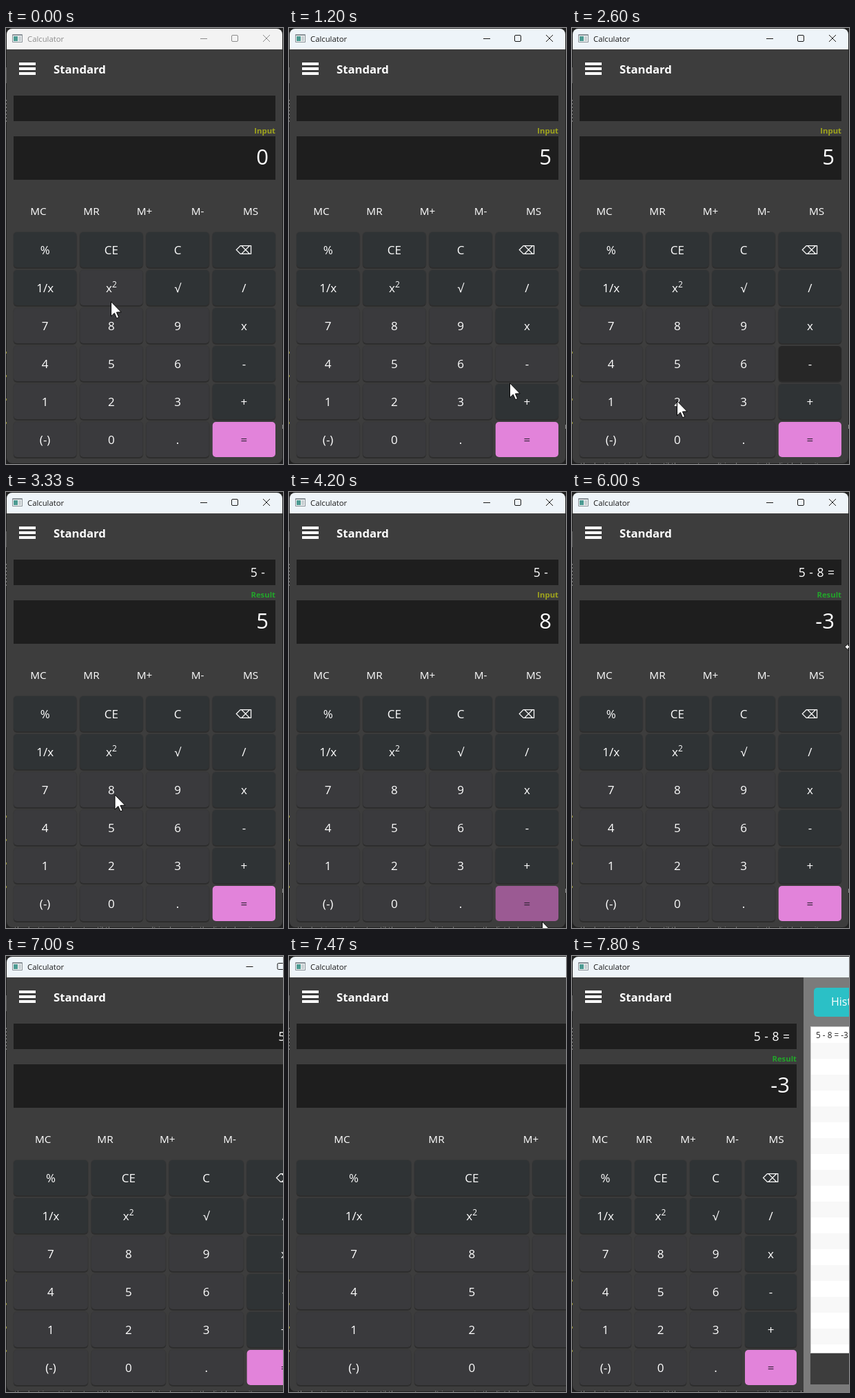
These frames come from a looping animation (402 px wide and 632 px high, 8 s). An HTML page with a canvas:

```html
<!DOCTYPE html>
<html lang="en">
<head>
<meta charset="utf-8">
<title>Calculator</title>
<style>
html, body { margin: 0; width: 100%; height: 100%; overflow: hidden; background: #202020; }
canvas { display: block; }
</style>
</head>
<body>
<canvas id="stage" width="402" height="632"></canvas>
<script>
const g = document.getElementById('stage').getContext('2d');
const LOOP = 8000, STEP = 200 / 3;
const FONT = '"Open Sans", "DejaVu Sans", sans-serif';
const KEYS = '% CE C ⌫ 1/x x² √ / 7 8 9 x 4 5 6 - 1 2 3 + (-) 0 . ='.split(' ');
const MEMORY = 'MC MR M+ M- MS'.split(' ');

// Moments at which the state changes, in ms
const FOCUS = 650, TYPE_5 = 770, PRESS_MINUS = 1700, MINUS_DONE = 2640, TYPE_8 = 3780,
  HOVER_EQUALS = 4190, RESULT = 4980, LEAVE_EQUALS = 5250, GRAB = 5960,
  DRAG = 6867, RELAYOUT = 7700, HISTORY = 7770;

// Pointer stops: arrival, rest in ms, x, y
const STOPS = [[0, 0, 152, 396], [500, 430, 153, 490], [1200, 0, 320, 514],
  [1700, 500, 343, 491], [2333, 200, 119, 579], [2600, 0, 152, 540],
  [3400, 667, 158, 429], [4200, 930, 367, 622], [5200, 0, 373, 558],
  [5400, 200, 352, 206], [GRAB, 0, 384, 212]];

function pointer(t) {
  const i = STOPS.findIndex(s => s[0] > t);
  const [start, rest, x, y] = STOPS[i - 1], [end, , x2, y2] = STOPS[i];
  const u = Math.max(0, (t - start - rest) / (end - start - rest));
  return [x + (x2 - x) * u, y + (y2 - y) * u];
}

function rect(x, y, w, h, fill, r = 0) {
  g.fillStyle = fill;
  g.beginPath();
  g.roundRect(x, y, w, h, r);
  g.fill();
}

function text(s, x, y, size, fill = '#fff', align = 'left', weight = 400) {
  g.font = `${weight} ${size}px ${FONT}`;
  g.textAlign = align;
  g.fillStyle = fill;
  g.fillText(s, x, y);
}

function outlined(path, x, y, scale) {
  g.save();
  g.translate(x, y);
  g.scale(scale, scale);
  g.lineWidth = 1 / scale;
  g.fillStyle = '#fff';
  g.strokeStyle = '#000';
  g.fill(path);
  g.stroke(path);
  g.restore();
}

const ARROW = new Path2D('M.4 .6V16.8L4.1 13.3 6.6 19 9 18 6.5 12.4 11.7 12.2Z');
const RESIZE = new Path2D('M0 0L5-5V-1.5H17V-5L22 0 17 5V1.5H5V5Z');

function backdrop() {
  rect(0, 0, 402, 632, '#202020');
  rect(0, 57, 1, 23, '#555');
  for (let y = 104; y < 136; y += 5) rect(0, y, 1, 2, '#777');
  for (let y = 469; y < 580; y += 34) rect(0, y, 1, 3, '#8f8a2a');
  rect(401, 575, 1, 6, '#888');
}

function titleBar(t, right) {
  const ink = t > FOCUS ? '#191919' : '#8c8c8c';
  g.save();
  g.beginPath();
  g.rect(0, 0, 402, 31);
  g.clip();
  rect(1, 1, right - 1, 40, t > 900 ? '#eef4f9' : '#f3f3f3', 8);
  g.restore();
  rect(9, 9, 15, 12, '#8a9298', 1);
  rect(10, 11, 13, 9, '#f2f5f6');
  rect(11, 12, 6, 7, '#4c9b92');
  rect(18, 12, 4, 7, '#c9d0d3');
  text('Calculator', 31, 20, 11.3, ink);
  const x = right - 119;
  g.strokeStyle = ink;
  g.lineWidth = 1;
  g.stroke(new Path2D(`M${x} 15.5h10M${x + 91} 10l10 10m0-10l-10 10`));
  g.beginPath();
  g.roundRect(x + 45.5, 10.5, 9, 9, 1.5);
  g.stroke();
}

function keyFill(key, i, t) {
  if (key === '=') return t < HOVER_EQUALS || t > LEAVE_EQUALS ? '#e283da' : '#9b5a93';
  if (key === '-' && t > PRESS_MINUS && t < MINUS_DONE) return '#272727';
  const hover = key === 'x²' && t < 170 || key === '-' && t > 1100 && t < PRESS_MINUS;
  return !hover && (i < 8 || i % 4 === 3) ? '#2f3335' : '#3a3a3d';
}

function keypad(t, right) {
  const pitch = (right - 6) / 4, w = pitch - 5;
  KEYS.forEach((key, i) => {
    const x = 11 + (i % 4) * pitch, y = 296 + 55 * (i >> 2), cx = x + w / 2;
    if (key !== '=') {
      rect(x - 1, y - 1, w + 2, 54, 'rgba(0,0,0,.09)', 6);
      rect(x, y + 1, w, 52, 'rgba(0,0,0,.2)', 5);
    }
    rect(x, y, w, 51, keyFill(key, i, t), 5);
    if (key === 'x²') {
      text('x', cx - 8, y + 32, 17);
      text('2', cx + 1, y + 25, 12);
    } else {
      text(key, cx, y + 32, 17, key === '=' ? '#2a2030' : '#fff', 'center');
    }
  });
}

function displays(t, right) {
  rect(11, 98, right - 11, 37, '#1e1e1e');
  rect(11, 157, right - 11, 63, '#1e1e1e');
  if (t > RELAYOUT && t < HISTORY) return;
  const done = t > RESULT, pending = t > MINUS_DONE;
  const isResult = done || pending && t < TYPE_8;
  const value = done ? '-3' : t > TYPE_8 ? '8' : t > TYPE_5 ? '5' : '0';
  g.wordSpacing = '1px';
  if (done) text('5 - 8 =', right - 10, 123, 17.5, '#fff', 'right');
  else if (pending) text('5 -', right - 15, 123, 17.5, '#fff', 'right');
  g.wordSpacing = '0px';
  text(isResult ? 'Result' : 'Input', right, 153, 11.3, isResult ? '#22a52a' : '#a0a51c', 'right', 700);
  text(value, right - 10, 198, 31, '#fff', 'right');
}

function historyPanel() {
  rect(336, 31, 66, 601, '#7b7b7b');
  rect(351, 46, 90, 42, '#2bc0c6', 5);
  text('History', 376, 72, 16);
  rect(346, 102, 60, 474, '#c8c8c8');
  rect(347, 103, 60, 472, '#fff');
  for (let y = 126; y < 575; y += 46) rect(347, y, 60, 23, '#f8f8f8');
  text('5 - 8 = -3', 354, 119, 11.8, '#222');
  rect(346, 576, 60, 45, '#3d3d3d');
}

function draw(t) {
  const grown = Math.max(0, t - DRAG) / 2;
  const right = t > RELAYOUT ? 326 : 391 + grown;
  backdrop();
  rect(1, 1, 400 + grown, 630, '#3d3d3d', 8);
  titleBar(t, 401 + grown);
  for (let y = 50; y < 65; y += 7) rect(19, y, 24, 4, '#fff');
  text('Standard', 69, 66, 16.7, '#fff', 'left', 700);
  displays(t, right);
  const pitch = (right - 6) / 5;
  MEMORY.forEach((s, i) => text(s, 8.5 + (i + .5) * pitch, 271, 15.3, '#fff', 'center'));
  keypad(t, right);
  if (t > HISTORY) historyPanel();
  if (t > 2100) text('the last input is kept until the next result is shown in the list below it',
    12, 638, 11, '#858585');
  if (t < GRAB) outlined(ARROW, ...pointer(t), 1.3);
  else outlined(RESIZE, 396 + grown, 224.5, 1);
}

function tick(now) {
  draw(Math.floor((now % LOOP + 4) / STEP) * STEP % LOOP);
  requestAnimationFrame(tick);
}
requestAnimationFrame(tick);
</script>
</body>
</html>
```
